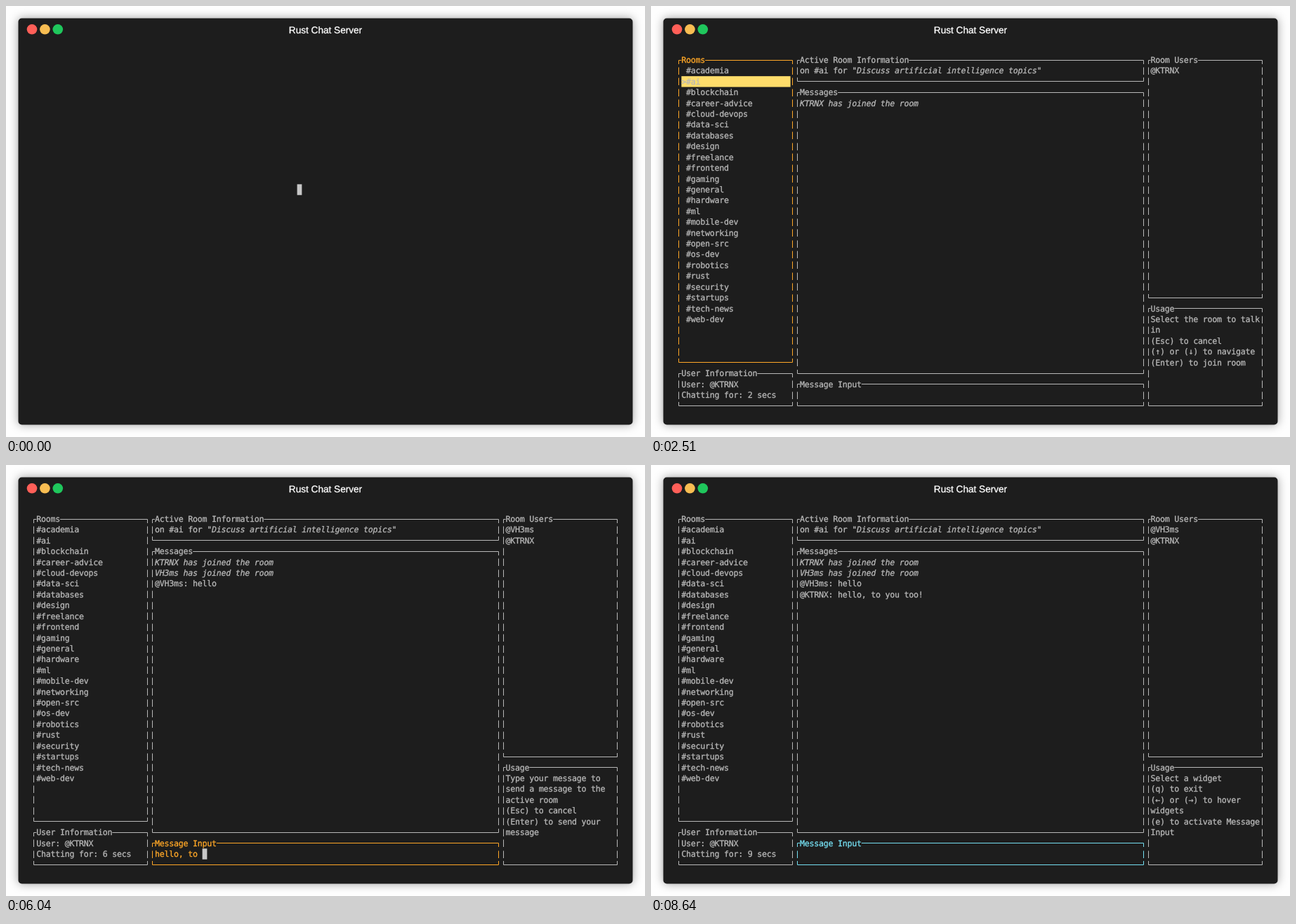
Recreate the animation shown at these times as an HTML page with a canvas. Size 910 px wide and 615 px high, loop 8.93 s.

```html
<!DOCTYPE html>
<html lang="en">
<head>
<meta charset="utf-8">
<title>Rust Chat Server</title>
<style>
  html, body { margin: 0; width: 100%; height: 100%; overflow: hidden; background: #fefefe; }
  canvas { display: block; }
</style>
</head>
<body>
<canvas id="stage" width="910" height="615"></canvas>
<script>
const ctx = document.getElementById('stage').getContext('2d');
const LOOP = 8930;

// Terminal grid
const CELL_W = 6.75, CELL_H = 15.42, LEFT = 36.6, TOP = 69.3;
const FONT = '11.6px "DejaVu Sans Mono", monospace';
const FG = '#b8b8b8', HOVER = '#75dff2', ACTIVE = '#ffa727';
const BACK = '#1d1d1d', CURSOR = '#c7c7c7', SELECTED = '#ffdd6b';

const ME = 'KTRNX', GUEST = 'VH3ms';
const REPLY = 'hello, to you too!';
const JOIN_HINT = 'Join at least one room to start chatting!';
const ROOMS = ('academia ai blockchain career-advice cloud-devops data-sci databases design ' +
  'freelance frontend gaming general hardware ml mobile-dev networking open-src os-dev ' +
  'robotics rust security startups tech-news web-dev').split(' ');

const hoverHelp = (...target) =>
  ['Select a widget', '(q) to exit', '(←) or (→) to hover', 'widgets', ...target];
const USAGE = {
  roomsHover: hoverHelp('(e) to activate Room', 'List'),
  inputHover: hoverHelp('(e) to activate Message', 'Input'),
  roomsActive: ['Select the room to talk', 'in', '(Esc) to cancel',
    '(↑) or (↓) to navigate', '(Enter) to join room'],
  inputActive: ['Type your message to', 'send a message to the', 'active room',
    '(Esc) to cancel', '(Enter) to send your', 'message']
};

// Each entry changes part of the state from its time on
const SCRIPT = [
  [0, { screen: 'cursor', focus: 'input', mode: 'Hover', secs: 0, pick: -1, joined: false, users: [], log: 0 }],
  [100, { screen: 'blank' }],
  [940, { screen: 'chat' }],
  [1440, { focus: 'rooms' }],
  [1830, { mode: 'Active', secs: 1 }],
  [1940, { pick: 0 }],
  [2110, { pick: 1 }],
  [2310, { joined: true }],
  [2410, { users: [ME], log: 1 }],
  [2510, { secs: 2 }],
  [2860, { secs: 3, users: [GUEST, ME], log: 2 }],
  [3200, { mode: 'Hover', pick: -1 }],
  [3470, { log: 3 }],
  [3530, { secs: 4 }],
  [4420, { focus: 'input' }],
  [4530, { mode: 'Active' }],
  [4640, { secs: 5 }],
  [5650, { secs: 6 }],
  [6670, { secs: 7 }],
  [7650, { secs: 8, log: 4 }],
  [7800, { mode: 'Hover' }],
  [8640, { secs: 9 }]
];
const KEYS = [4910, 5080, 5160, 5310, 5450, 5520, 5590, 5720, 5790, 5940,
  6740, 6890, 6960, 7030, 7090, 7180, 7260, 7580];

function stateAt(t) {
  const state = {};
  for (const [time, change] of SCRIPT) if (time <= t) Object.assign(state, change);
  const typed = state.log > 3 ? 0 : KEYS.filter(time => time <= t).length;
  state.input = REPLY.slice(0, typed);
  return state;
}

const colX = col => LEFT + col * CELL_W;
const rowY = row => TOP + row * CELL_H;

function fillCells(col, row, count, color) {
  ctx.fillStyle = color;
  ctx.fillRect(colX(col), rowY(row), count * CELL_W, CELL_H);
}

// A hairline stroke gives the slightly heavy strokes of smoothed text
function drawText(text, x, y, color) {
  ctx.fillStyle = ctx.strokeStyle = color;
  ctx.lineWidth = 0.3;
  ctx.fillText(text, x, y);
  ctx.strokeText(text, x, y);
}

function print(text, col, row, color = FG, style = '') {
  ctx.font = `${style} ${FONT}`;
  ctx.textAlign = 'center';
  [...text].forEach((ch, i) => drawText(ch, colX(col + i + 0.5), rowY(row) + 11.6, color));
}

const midX = col => Math.floor(colX(col + 0.5)) + 0.5;
const midY = row => Math.floor(rowY(row + 0.5)) + 0.5;

function box(title, left, top, right, bottom, color = FG) {
  const x1 = midX(left), x2 = midX(right), y1 = midY(top), y2 = midY(bottom);
  ctx.strokeStyle = color;
  ctx.lineWidth = 1;
  ctx.beginPath();
  ctx.moveTo(x1, y1 + 5.5);
  ctx.lineTo(x1, y1);
  ctx.lineTo(colX(left + 1), y1);
  ctx.moveTo(colX(left + 1 + title.length), y1);
  ctx.lineTo(x2, y1);
  ctx.lineTo(x2, y1 + 5.5);
  ctx.moveTo(x1, y2 - 5.5);
  ctx.lineTo(x1, y2);
  ctx.lineTo(x2, y2);
  ctx.lineTo(x2, y2 - 5.5);
  for (let row = top + 1; row < bottom; row++) {
    const y = midY(row);
    for (const x of [x1, x2]) {
      ctx.moveTo(x, y - 5);
      ctx.lineTo(x, y + 5.5);
    }
  }
  ctx.stroke();
  print(title, left + 1, top, color);
}

function drawWindow() {
  ctx.fillStyle = '#fefefe';
  ctx.fillRect(0, 0, 910, 615);
  ctx.save();
  ctx.shadowColor = 'rgba(0, 0, 0, 0.38)';
  ctx.shadowBlur = 14;
  ctx.fillStyle = BACK;
  ctx.beginPath();
  ctx.roundRect(17.5, 17.5, 875, 580, 5);
  ctx.fill();
  ctx.restore();
  ['#ff5f58', '#f8bd52', '#1fc75c'].forEach((color, i) => {
    ctx.fillStyle = color;
    ctx.beginPath();
    ctx.arc(37 + i * 18.4, 33.3, 7.3, 0, Math.PI * 2);
    ctx.fill();
  });
  ctx.font = '13.6px "Liberation Sans", Arial, sans-serif';
  ctx.textAlign = 'center';
  drawText('Rust Chat Server', 455, 38.5, '#fff');
}

function drawRooms(state, color) {
  box('Rooms', 0, 0, 24, 28, color);
  const indent = state.pick >= 0 ? 2 : 1;
  ROOMS.forEach((room, i) => {
    if (i === state.pick) {
      fillCells(1, i + 1, 23, SELECTED);
      print('>', 1, i + 1);
    }
    print('#' + room, indent, i + 1);
  });
}

function drawMessages(state) {
  box('Active Room Information', 25, 0, 98, 2);
  box('Messages', 25, 3, 98, 29);
  if (!state.joined) {
    print(JOIN_HINT, 26, 1);
    print(JOIN_HINT, 26, 4);
    return;
  }
  print('on #ai for ', 26, 1);
  print('"Discuss artificial intelligence topics"', 37, 1, FG, 'italic');
  const log = [`${ME} has joined the room`, `${GUEST} has joined the room`,
    `@${GUEST}: hello`, `@${ME}: ${REPLY}`];
  log.slice(0, state.log).forEach((line, i) =>
    print(line, 26, 4 + i, FG, line[0] === '@' ? '' : 'italic'));
}

function drawChat(state) {
  const accent = state.mode === 'Active' ? ACTIVE : HOVER;
  const colorOf = name => state.focus === name ? accent : FG;

  drawRooms(state, colorOf('rooms'));
  drawMessages(state);

  box('User Information', 0, 29, 24, 32);
  print(`User: @${ME}`, 1, 30);
  print(`Chatting for: ${state.secs} secs`, 1, 31);

  box('Message Input', 25, 30, 98, 32, colorOf('input'));
  if (state.focus === 'input' && state.mode === 'Active') {
    print(state.input, 26, 31, ACTIVE);
    fillCells(26 + state.input.length, 31, 1, CURSOR);
  }

  box('Room Users', 99, 0, 123, 22);
  state.users.forEach((user, i) => print('@' + user, 100, 1 + i));

  box('Usage', 99, 23, 123, 32);
  USAGE[state.focus + state.mode].forEach((line, i) => print(line, 100, 24 + i));
}

function draw(t) {
  const state = stateAt(t);
  drawWindow();
  if (state.screen === 'cursor') fillCells(56, 12, 1, CURSOR);
  if (state.screen === 'chat') drawChat(state);
}

ctx.textRendering = 'geometricPrecision';
ctx.lineJoin = 'round';
const start = performance.now();
function tick() {
  draw((performance.now() - start) % LOOP);
  requestAnimationFrame(tick);
}
tick();
</script>
</body>
</html>
```
